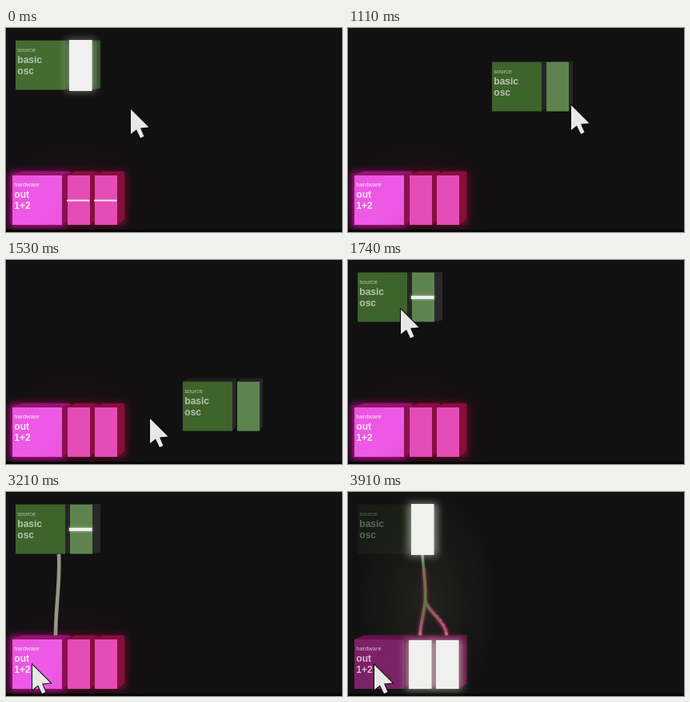
Write an HTML page that moves like this. It is 420 px wide and 256 px high and loops after 3980 ms.

```html
<!DOCTYPE html>
<html lang="en">
<head>
<meta charset="utf-8">
<title>Patching blocks</title>
<style>
  html, body { margin: 0; width: 100%; height: 100%; overflow: hidden; background: #111; }
  svg { display: block; width: 420px; height: 256px; }
  text { font-family: "Liberation Sans", Arial, sans-serif; font-size: 7.5px; }
  .name { font-size: 12px; font-weight: bold; }
  .cable { fill: none; stroke-width: 4.6; }
  #cursor { paint-order: stroke; }
</style>
</head>
<body>
<svg id="stage" viewBox="0 0 420 256">
  <defs>
    <filter id="soft" x="-100%" y="-100%" width="300%" height="300%"><feGaussianBlur stdDeviation="5"/></filter>
    <filter id="tight" x="-100%" y="-300%" width="300%" height="700%"><feGaussianBlur stdDeviation="1.6"/></filter>
    <filter id="edge" filterUnits="userSpaceOnUse" x="60" y="60" width="100" height="140"><feGaussianBlur stdDeviation="1.4"/></filter>
    <radialGradient id="haze">
      <stop offset="0" stop-color="#6c0830" stop-opacity=".2"/>
      <stop offset="1" stop-color="#300818" stop-opacity="0"/>
    </radialGradient>
    <radialGradient id="mist">
      <stop offset="0" stop-color="#5a6450" stop-opacity=".22"/>
      <stop offset="1" stop-color="#5a6450" stop-opacity="0"/>
    </radialGradient>
    <linearGradient id="pink" x2="1" y2="1">
      <stop offset="0" stop-color="#ea54de"/>
      <stop offset=".6" stop-color="#ee5ae6"/>
      <stop offset="1" stop-color="#ea54de"/>
    </linearGradient>
    <linearGradient id="signal" gradientUnits="userSpaceOnUse" x1="0" y1="78" x2="0" y2="182">
      <stop offset="0" stop-color="#92968a"/>
      <stop offset=".15" stop-color="#58804c"/>
      <stop offset=".75" stop-color="#587a44"/>
      <stop offset=".92" stop-color="#a0587c"/>
      <stop offset="1" stop-color="#a49a9e"/>
    </linearGradient>
  </defs>
  <rect width="420" height="256" fill="#111"/>
  <g id="glow">
    <ellipse cx="85" cy="205" rx="125" ry="88" fill="url(#haze)"/>
    <rect x="5" y="181" width="68" height="69" fill="#d808a0" opacity=".85" filter="url(#soft)"/>
    <rect x="70" y="180" width="80" height="68" fill="#980830" opacity=".65" filter="url(#soft)"/>
  </g>
  <ellipse id="air" cx="98" cy="140" rx="90" ry="150" fill="url(#mist)"/>
  <rect y="253" width="420" height="3" fill="#070606"/>
  <g id="osc"></g>
  <g id="wires">
    <path id="wire" class="cable" stroke="#96978b"/>
    <g id="split">
      <path class="cable" style="stroke-width:6" stroke="#b0144c" opacity=".8" filter="url(#edge)"
        d="M95 96C96 110 97 122 96.500 136C96 150 90 165 90 182M96.500 136C99 150 123 162 123.500 182"/>
      <path class="cable" style="stroke-width:3.6" stroke="url(#signal)"
        d="M93 78C94 95 97.500 115 96.500 136C96 150 90 165 90 182M96.500 136C99 150 123 162 123.500 182"/>
      <path id="flow" class="cable" style="stroke-width:2.6" stroke="#d83888" stroke-dasharray="3 4"
        d="M105 150C112 156 123 166 123.500 178"/>
    </g>
  </g>
  <g id="out"></g>
  <g id="bars"></g>
  <path id="cursor" d="M0 0V31L7 25.500L12 36L16.500 34L12 23.500L22.500 22.500Z"
    fill="#e8e8e8" stroke="#0b0b0b" stroke-width="2"/>
</svg>
<script>
const $ = id => document.getElementById(id);
const LOOP = 3980, FIRST = 130, STEP = 70;
const EYE = { x: 441, y: 8, depth: 0.03 };

function add(parent, tag, attrs, content) {
  const el = document.createElementNS('http://www.w3.org/2000/svg', tag);
  set(el, attrs);
  if (content) el.textContent = content;
  return parent.appendChild(el);
}
function set(el, attrs) {
  for (const k in attrs) el.setAttribute(k, attrs[k]);
}

// Front face plus the top and right faces, receding to one vanishing point.
function makeBox(parent, dx, w, colors) {
  const top = add(parent, 'polygon', { fill: colors.top });
  const side = add(parent, 'polygon', { fill: colors.side });
  const front = add(parent, 'rect', { width: w, height: 62, fill: colors.front });
  const back = (x, y) => [x + (EYE.x - x) * EYE.depth, y + (EYE.y - y) * EYE.depth];
  return {
    side, front,
    place(x, y) {
      const l = x + dx, r = l + w, b = y + 62;
      set(front, { x: l, y });
      set(top, { points: [l, y, r, y, ...back(r, y), ...back(l, y)].join(' ') });
      set(side, { points: [r, y, r, b, ...back(r, b), ...back(r, y)].join(' ') });
    }
  };
}

function makeBlock(parent, labels, ports, face, port, ink) {
  const body = add(parent, 'g', {});
  const boxes = [makeBox(body, 0, 62, face), ...ports.map(dx => makeBox(body, dx, 28, port))];
  const words = add(parent, 'g', { fill: ink });
  labels.forEach((s, i) => add(words, 'text',
    { x: 2.3, y: [14, 28.3, 42.3][i], class: i ? 'name' : 'kind' }, s));
  return {
    body, boxes, words,
    place(x, y) {
      boxes.forEach(b => b.place(x, y));
      set(words, { transform: `translate(${x} ${y})` });
    }
  };
}

const osc = makeBlock($('osc'), ['source', 'basic', 'osc'], [68],
  { front: '#3e632b', side: '#232622', top: '#1d1e1c' },
  { front: '#5f834f', side: '#282a27', top: '#20231e' }, '#b9c4b0');
const out = makeBlock($('out'), ['hardware', 'out', '1+2'], [69, 103],
  { front: 'url(#pink)', side: '#8a1050', top: '#96146e' },
  { front: '#e44cb6', side: '#880e3e', top: '#880e42' }, '#ffeafa');
out.place(8, 185);
const veil = add(out.body, 'polygon',
  { points: '8,185 21,180 149,180 149,240 139,247 8,247', fill: '#56113e' });

const bars = [[79, 47], [76, 216.5], [110, 216.5]].map(([x, y]) => ({
  x, y,
  halo: add($('bars'), 'rect', { fill: '#dfe8d8' }),
  core: add($('bars'), 'rect', { fill: '#f0f0ee' })
}));
bars.forEach(b => $('bars').append(b.core));

function drawBar(bar, h, halo) {
  const { x, y } = bar;
  const wide = h > 12, pad = wide ? 4 : 1;
  set(bar.core, { x, y: y - h / 2, width: 28.5, height: h });
  set(bar.halo, { x: x - pad, y: y - h / 2 - 1, width: 28.5 + 2 * pad, height: h ? h + 2 : 0,
    opacity: halo, filter: wide ? 'url(#soft)' : 'url(#tight)' });
}

// Rows are [time, x, y]; slopes never overshoot the keys.
const cursorKeys = [
  [130, 156, 102], [340, 98, 80], [550, 41, 54], [760, 41, 54], [900, 64, 57],
  [1040, 190, 80], [1110, 279, 97], [1180, 339, 116], [1250, 370, 139], [1320, 358, 166],
  [1460, 246, 200], [1530, 180, 199], [1600, 120, 168], [1740, 66, 62], [1880, 78, 70],
  [2020, 108, 120], [2160, 88, 185], [2300, 42, 217], [2370, 38, 217], [2800, 33, 217], [3980, 33, 217]
];
const blockKeys = [
  [760, 12, 15.6], [900, 24, 18], [1040, 107, 31], [1110, 180, 42.6], [1180, 240, 60],
  [1320, 288, 110], [1460, 264, 149], [1530, 221, 152.6], [1600, 140, 120], [1670, 56, 55], [1740, 12, 15.6]
];

function sample(keys, t) {
  const last = keys.length - 1;
  if (t <= keys[0][0]) return keys[0].slice(1);
  if (t >= keys[last][0]) return keys[last].slice(1);
  const i = keys.findIndex(k => k[0] > t) - 1;
  const a = keys[i], b = keys[i + 1], span = b[0] - a[0], u = (t - a[0]) / span;
  const slope = (n, c) => n < 0 || n >= last ? 0 : (keys[n + 1][c] - keys[n][c]) / (keys[n + 1][0] - keys[n][0]);
  const tangent = (n, c) => {
    const p = slope(n - 1, c), q = slope(n, c);
    return p * q > 0 ? 2 * p * q / (p + q) : 0;
  };
  return [1, 2].map(c =>
    a[c] + (b[c] - a[c]) * u * u * (3 - 2 * u) +
    span * u * (1 - u) * ((1 - u) * tangent(i, c) - u * tangent(i + 1, c)));
}

const ramp = (t, from, to) => Math.max(0, Math.min(1, (t - from) / (to - from)));
const show = (el, on) => set(el, { visibility: on ? 'visible' : 'hidden' });

function drawWire(t, tip) {
  const live = t >= 3350;
  show($('wire'), t >= 1880 && !live);
  show($('split'), live);
  let [x, y] = tip;
  if (t >= 2160) {
    x = 79.5 + 17.5 * Math.cos(Math.PI * (t - 2370) / 840);
    y = 182;
  }
  const drop = (y - 78) / 104;
  set($('wire'), { d: `M66 78C68 ${78 + 32 * drop} ${x + (x - 66) * 0.04} ${78 + 68 * drop} ${x} ${y}` });
  set($('flow'), { 'stroke-dashoffset': (3910 - t) / 20 });
}

function draw(t) {
  const tip = sample(cursorKeys, t);
  const idle = t < 830;
  const dragging = t >= 830 && t < 1740;
  const dim = ramp(t, 3210, 3420);
  const level = idle ? 1 : ramp(t, 3280, 3490);

  osc.place(...sample(blockKeys, t));
  osc.boxes.forEach((b, i) => set(b.side, { fill: idle ? '#2c4a21' : i ? '#282a27' : '#232622' }));
  set(osc.boxes[0].front, { fill: idle ? '#446b30' : '#3e632b' });
  set(osc.body, { opacity: 1 - 0.86 * dim });
  set(osc.words, { opacity: 1 - 0.57 * dim });
  set(veil, { opacity: 0.75 * dim });
  set(out.words, { opacity: 1 - 0.28 * dim });
  set($('glow'), { opacity: 1 - 0.95 * dim });
  set($('air'), { opacity: dim });

  drawBar(bars[0], dragging ? 0 : 4 + 60 * level, 0.42 + 0.13 * dim);
  const echo = ramp(t, 3350, 3560);
  bars.slice(1).forEach(b => drawBar(b, idle ? 2 : 61 * echo, idle ? 0 : 0.55));

  drawWire(t, tip);
  set($('cursor'), { transform: `translate(${tip})` });
}

const start = performance.now();
function tick() {
  const t = (performance.now() - start) % LOOP;
  draw(t < FIRST ? 0 : FIRST + STEP * Math.floor((t - FIRST) / STEP));
  requestAnimationFrame(tick);
}
tick();
</script>
</body>
</html>
```
